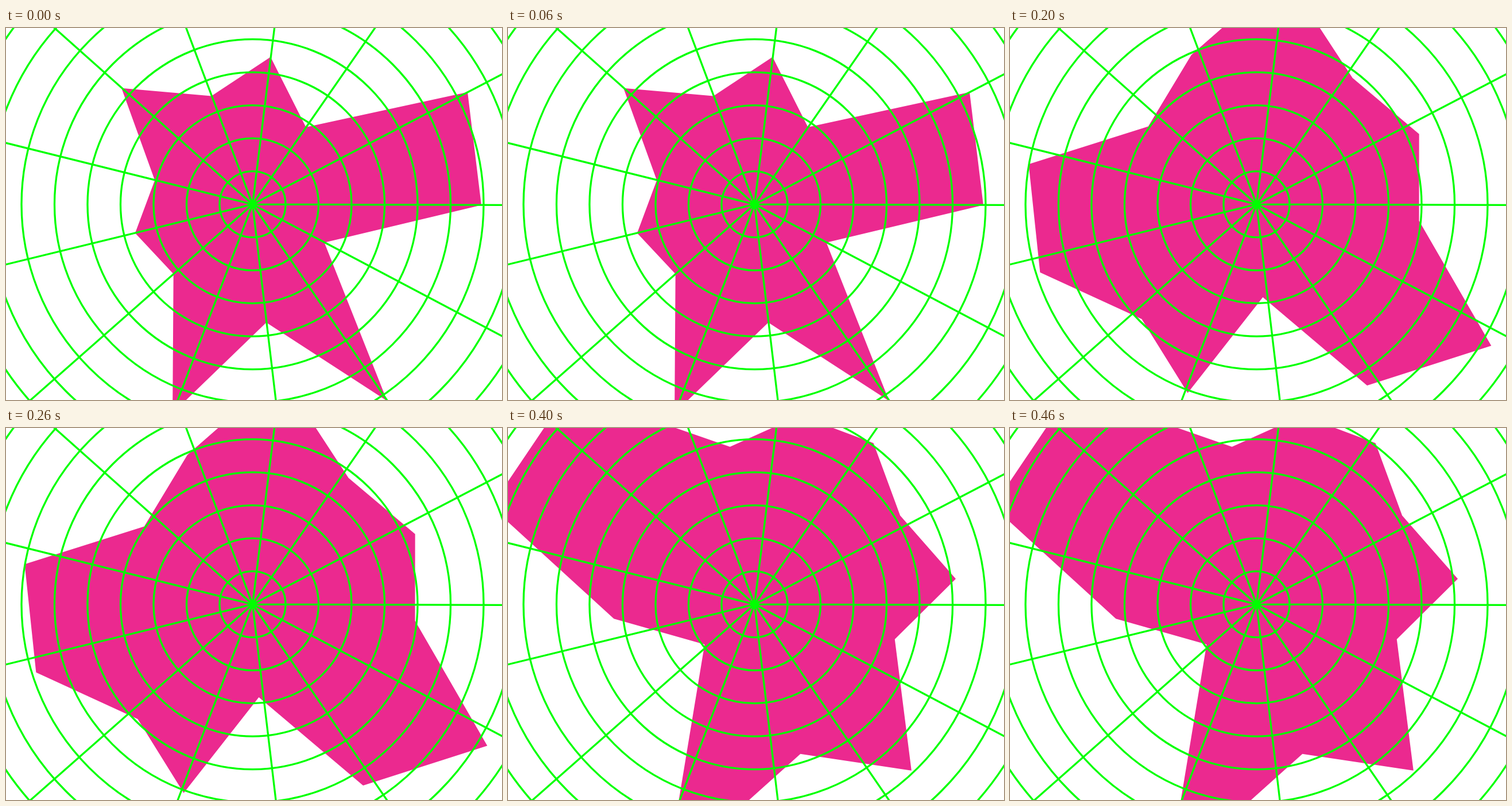
Recreate the animation shown at these times as an HTML page with a canvas. Size 864 by 648 pixels, loop 0.5 s.

```html
<!DOCTYPE html>
<html lang="en">
<head>
<meta charset="utf-8">
<title>Radar blob</title>
<style>
  html, body { margin: 0; width: 100%; height: 100%; overflow: hidden; background: #fff; }
  canvas { display: block; }
</style>
</head>
<body>
<canvas id="stage" width="864" height="648"></canvas>
<script>
const ctx = document.getElementById('stage').getContext('2d');
const WIDTH = 864, HEIGHT = 648;
const CENTER = { x: 429.5, y: 307.2 };
const RING_STEP = 57.5, RINGS = 9;
const SPOKES = 13, TILT = 0.0025;
const POSE_MS = 100;

// A star hangs on the grid's spoke directions: a hub, and its reach along each spoke.
const poses = [
  star(429, 307.5, [399, 142, 415, 207, 389, 183, 210, 175, 305, 202, 259, 164, 423]),
  star(381.5, 324.5, [287, 228, 346, 305, 320, 259, 179, 248, 250, 405, 330, 251, 518]),
  star(424.5, 335, [288, 468, 349, 135, 322, 260, 383, 404, 246, 308, 433, 302, 325]),
  star(365, 326, [516, 228, 249, 306, 160, 284, 163, 169, 328, 204, 289, 462, 240]),
  star(473, 262, [307, 227, 406, 308, 551, 174, 297, 518, 491, 245, 286, 287, 237])
];
const grid = makeGrid();

function alongSpoke(hub, spoke, distance) {
  const angle = spoke * Math.PI * 2 / SPOKES + TILT;
  return [hub.x + distance * Math.cos(angle), hub.y + distance * Math.sin(angle)];
}

function star(x, y, reaches) {
  const path = new Path2D();
  reaches.forEach((reach, spoke) => path.lineTo(...alongSpoke({ x, y }, spoke, reach)));
  path.closePath();
  return path;
}

function makeGrid() {
  const path = new Path2D();
  for (let ring = 1; ring <= RINGS; ring++) {
    const radius = ring * RING_STEP;
    path.moveTo(CENTER.x + radius, CENTER.y);
    path.arc(CENTER.x, CENTER.y, radius, 0, Math.PI * 2);
  }
  for (let spoke = 0; spoke < SPOKES; spoke++) {
    path.moveTo(CENTER.x, CENTER.y);
    path.lineTo(...alongSpoke(CENTER, spoke, WIDTH));
  }
  return path;
}

function draw(time) {
  ctx.fillStyle = '#fff';
  ctx.fillRect(0, 0, WIDTH, HEIGHT);
  ctx.fillStyle = '#eb298f';
  ctx.fill(poses[Math.floor(time / POSE_MS) % poses.length]);
  ctx.strokeStyle = '#0f0';
  ctx.lineWidth = 3.3;
  ctx.stroke(grid);
}

const start = performance.now();
function tick() {
  draw(performance.now() - start);
  requestAnimationFrame(tick);
}
tick();
</script>
</body>
</html>
```
